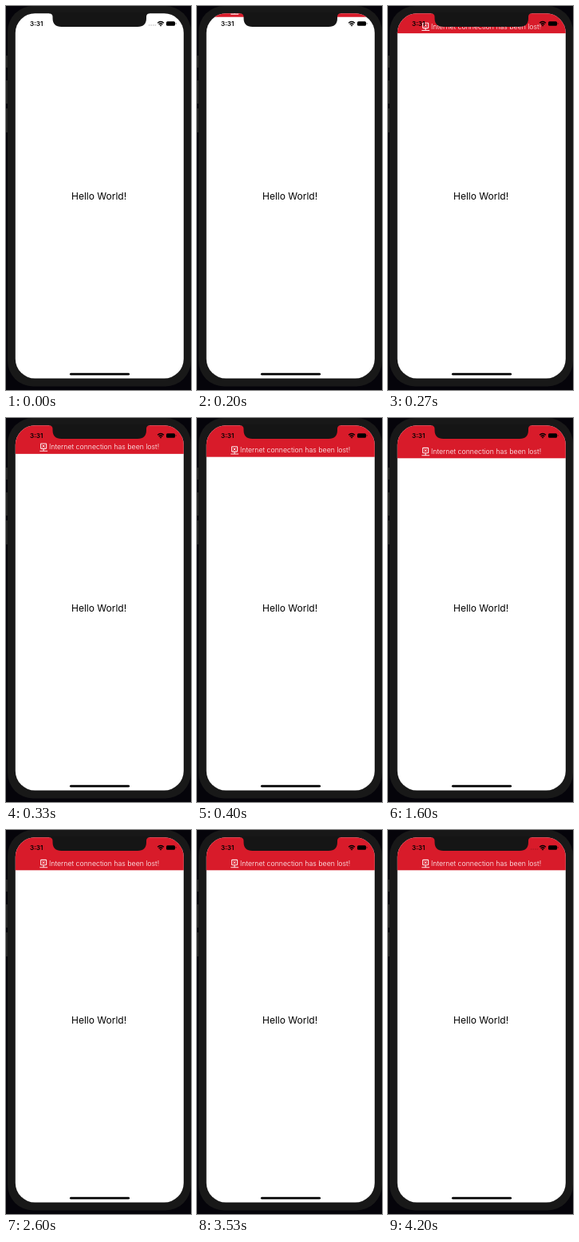
Write an HTML page that moves like this. It is 232 px wide and 480 px high and loops after 8000 ms.

```html
<!DOCTYPE html>
<html lang="en">
<head>
<meta charset="utf-8">
<title>Connection banner</title>
<style>
  html, body { margin: 0; width: 100%; height: 100%; overflow: hidden; background: #05040a; }
  svg { display: block; width: 100vw; height: 100vh; }
  text { font-family: Inter, "Liberation Sans", sans-serif; }
  .note { font-size: 8.75px; font-weight: 300; }
</style>
</head>
<body>
<svg viewBox="0 0 232 480">
  <defs>
    <clipPath id="screen"><rect x="11.8" y="9.2" width="211" height="456.3" rx="24.5"/></clipPath>
  </defs>

  <!-- phone body and side buttons -->
  <rect width="232" height="480" fill="#05040a"/>
  <g fill="#242424">
    <rect x="0" y="62" width="4" height="15"/>
    <rect x="0" y="93" width="4" height="29"/>
    <rect x="0" y="128" width="4" height="30"/>
  </g>
  <rect x="2" y="0" width="230" height="475.5" rx="32" fill="#181818"/>

  <g clip-path="url(#screen)">
    <rect x="11" y="9" width="213" height="457" fill="#fff"/>
    <text x="82" y="242.2" font-size="12">Hello World!</text>
    <rect x="80" y="458.8" width="75" height="2.8" rx="1.4"/>

    <g id="banner">
      <rect x="11" y="-20" width="213" height="70.3" fill="#d81b2a"/>
      <g fill="none" stroke="#fff" opacity=".9">
        <rect x="43.6" y="37.4" width="7" height="6.4" rx=".6" stroke-width="1.1"/>
        <path d="M45.6 39.1l3 3m0-3l-3 3" stroke-width="1"/>
        <path d="M47.1 44v2.4M42.3 46.7h9.8" stroke-width="1.1"/>
      </g>
      <text class="note" x="54" y="44.8" fill="#fff">Internet connection has been lost!</text>
    </g>

    <!-- status bar -->
    <text x="30" y="25" font-size="8.1" font-weight="600">3:31</text>
    <path id="dots" d="M178.8 24h9.4" stroke="#000" stroke-width="1.5" stroke-dasharray="1.6 1"/>
    <path d="M190.1 21.3q3.9-3.5 7.8 0M191.6 23q2.4-2.1 4.8 0" fill="none" stroke="#000" stroke-width="1.3"/>
    <path d="M192.5 24q1.5-1.2 3 0l-1.5 1.6z"/>
    <rect x="201" y="19.3" width="11" height="5.4" rx="1.5"/>
    <rect x="212.6" y="21" width=".9" height="2" rx=".4" opacity=".6"/>
  </g>

  <!-- notch -->
  <path d="M54 8H180V9.2Q176 9.4 176 13.5V15Q176 26 165 26H69.5Q58.5 26 58.5 15V13.5Q58.5 9.4 54 9.2z" fill="#151515"/>
</svg>

<script>
const LOOP = 8000, TICK = 1000 / 15;
const START = 178, RATE = 0.0223, TRAVEL = 41;
const banner = document.getElementById("banner");
const dots = document.getElementById("dots");

// Critically damped spring: 1 at the start, 0 when settled.
function spring(ms) {
  const x = RATE * Math.max(0, ms);
  return (1 + x) * Math.exp(-x);
}

function draw(t) {
  // The motion runs at 15 steps per second.
  const time = Math.floor((t + 3.4) / TICK) * TICK;
  const shown = t >= 200;
  const offset = -TRAVEL * spring(time + 3 - START);
  banner.setAttribute("visibility", shown ? "visible" : "hidden");
  banner.setAttribute("transform", `translate(0 ${offset.toFixed(2)})`);
  dots.setAttribute("opacity", !shown ? 0.2 : t >= 4070 ? 0.15 : 0);
}

const begin = performance.now();
function frame() {
  draw((performance.now() - begin) % LOOP);
  requestAnimationFrame(frame);
}
draw(0);
requestAnimationFrame(frame);
</script>
</body>
</html>
```
